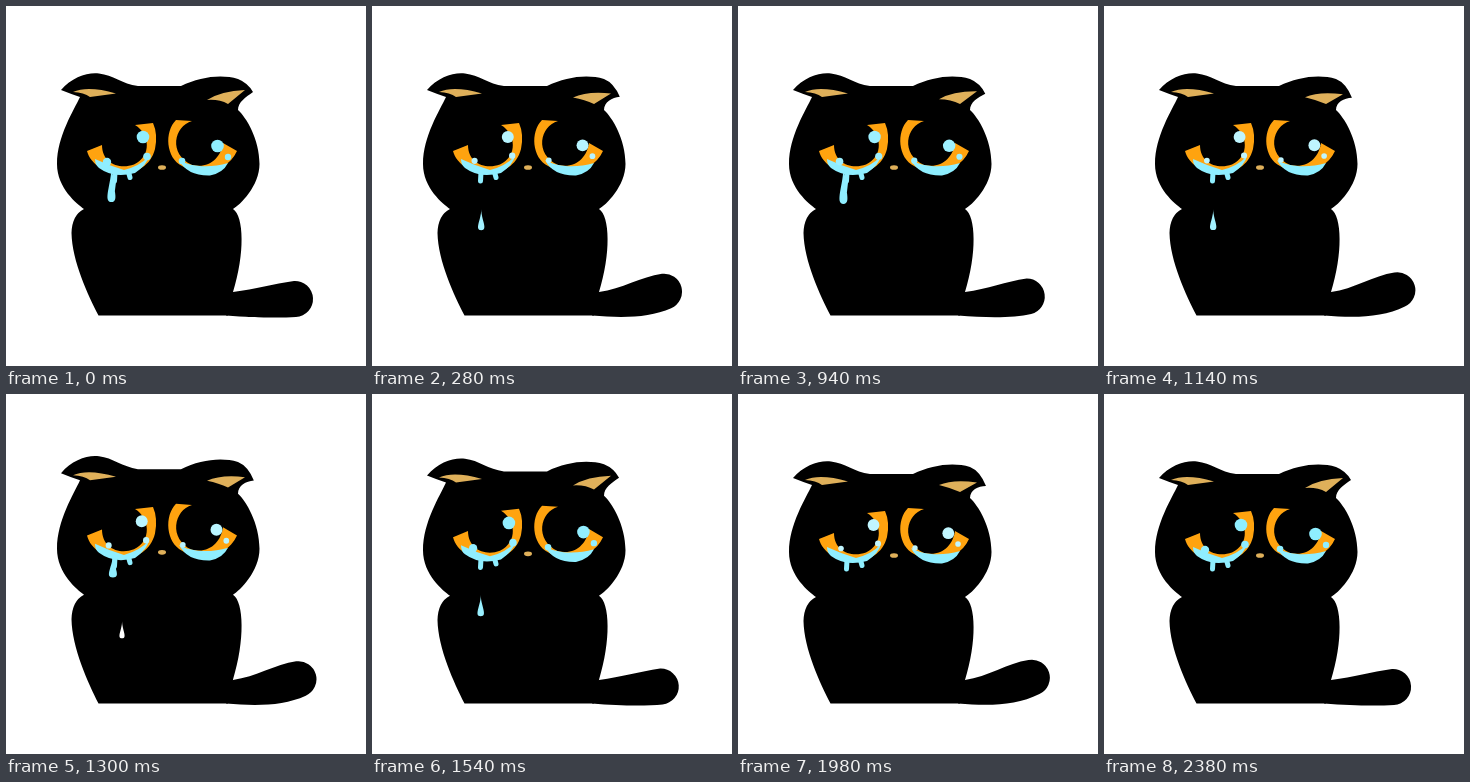
An HTML page that plays this animation: 360x360 px, repeating every 2.4 s.

```html
<!DOCTYPE html>
<html lang="en">
<head>
<meta charset="utf-8">
<title>Crying cat</title>
<style>
  html, body { margin: 0; width: 100%; height: 100%; overflow: hidden; background: #fff; }
  svg { display: block; width: 100vw; height: 100vh; }
  .iris { fill: #ffa30f; }
  .ear { fill: #dfb05a; }
  .water { fill: #8feeff; }
  .stub { stroke: #8feeff; stroke-width: 5; stroke-linecap: round; }
</style>
</head>
<body>
<svg viewBox="0 0 360 360">
  <path id="tail"/>
  <g id="cat">
    <path id="body"/>
    <path class="ear" d="M67 86Q82 79.500 110 87.500L84 91Q78 86.500 67 86Z"/>
    <path id="ear" class="ear"/>
    <path class="iris" d="M81 145C88 172 140 178 149 143Q152 128 147 117L129 119C144 128 146 150 128 158.500C113 164 96 157 96 139Z"/>
    <path class="iris" d="M186 115L170 114C158 126 160 152 176 160C195 172 222 165 231 145L217 137C215 151 204 163 186 159C162 148 168 120 186 115Z"/>
    <path class="water" d="M89 153Q104 160 118 164Q134 160 143 150Q141 159 129 167Q108 173 93 162Q89 159 89 153Z"/>
    <path class="water" d="M173 154C182 160 202 163 222 157Q217 167 204 169.500Q181 170 173 154Z"/>
    <path class="stub" d="M109 166L108.500 175M122.500 166L124 171.500"/>
    <g id="shine"></g>
    <ellipse class="ear" cx="156" cy="161.500" rx="4" ry="2.300"/>
  </g>
  <path id="drip" class="water"/>
  <path id="drop"/>
</svg>
<script>
const LOOP = 2400, SWAY = 800;
const $ = id => document.getElementById(id);
const set = (id, name, value) => $(id).setAttribute(name, value);
const clamp = x => Math.max(0, Math.min(1, x));

// Start and fall time of each tear
const TEARS = [[0, 600], [926, 460], [1445, 220]];
// Time and vertical stretch of the sob
const SOB = [[1220, 0], [1400, .05], [1550, .011], [1680, .02], [1860, 0]];
// x, y, radius, and change of each while swaying
const SHINES = [
  [137, 131, 6.3, -1.5, 0, -.4], [211.5, 140, 6.3, -1.2, -.8, -.4],
  [101, 156, 4.2, 2, -1.5, -1.4], [141, 150.5, 3.8, -1, -1, -.8],
  [176, 155, 3.3, 1, -1, -.6], [222, 151, 3.2, -2, -1, -.4]
];

function stretchAt(t) {
  for (let i = 1; i < SOB.length; i++) {
    const [t0, a] = SOB[i - 1], [t1, b] = SOB[i];
    if (t >= t0 && t < t1) {
      const k = (t - t0) / (t1 - t0);
      return a + (b - a) * k * k * (3 - 2 * k);
    }
  }
  return 0;
}

function teardrop(x, top, bottom, width) {
  const mid = (top + bottom) / 2, w = width * 1.125;
  return `M${x} ${top}C${x} ${mid} ${x + w} ${bottom} ${x} ${bottom}S${x} ${mid} ${x} ${top}Z`
    .replace('S', `C${x - w} ${bottom} `);
}

const paler = k => `rgb(${143 + 112 * k},${238 + 17 * k},255)`;

function drawTears(t) {
  let drip = '', drop = '';
  for (const [start, fall] of TEARS) {
    const p = (t - start) / fall, grow = clamp(1 + p / 1.1);
    if (grow > 0 && p < .12) {
      const bottom = 175 + 21 * grow + 58 * Math.max(0, p), x = 108 - 2.5 * grow;
      drip = teardrop(x, 160, bottom, 8) + `M106.500 168H111L${x + 3} ${bottom - 8}H${x - 2}Z`;
    } else if (p >= .12 && p <= 1) {
      const bottom = 197 + 58 * p;
      drop = teardrop(105 + 3 * p + 13 * p * p, bottom - 26 + 11 * p, bottom, 8 - 3.5 * p);
      set('drop', 'fill', paler(clamp((p - .4) * 2.5)));
    }
  }
  set('drip', 'd', drip);
  set('drop', 'd', drop);
}

function draw(t) {
  const sway = (1 - Math.cos(t / SWAY * 2 * Math.PI)) / 2;
  const x = 290 + 2.5 * sway, y = 293 - 9 * sway;
  set('tail', 'd', `M222 287L227 286C250 283 ${x - 23} ${y - 15} ${x - 2} ${y - 18}
    A18 18 0 0 1 ${x + 9 * sway} ${y + 18 - 2 * sway}C${x - 15} 312 250 312 220 309.5Z`);
  set('body', 'd', `M55 84C66 71 82 66 93 67.500C107 69 116 78 132 80H175
    C194 71 215 68 232 73Q242 77 ${247 + sway} ${86 + 6 * sway}
    C240 ${91 + sway} 232 96 232 104C240 111 253.500 133 253.500 158C253.500 180 234 199 227 203
    C238 210 239 248 227 286L222 309.500H92.500C82 289 66 255 65.500 227Q66 209 78 203
    C71 198 51 182 51 158C51 130 68 104 74 91Q65 88 55 84Z`);
  set('ear', 'd', `M201 ${94 - 3 * sway}Q215 85 239 ${84 + 4.5 * sway}
    L222 98Q213 ${93 + sway} 201 ${94 - 3 * sway}Z`);
  set('cat', 'transform', `translate(0 309) scale(1 ${1 + stretchAt(t)}) translate(0 -309)`);
  $('shine').innerHTML = SHINES.map(([cx, cy, r, dx, dy, dr]) =>
    `<circle cx="${cx + dx * sway}" cy="${cy + dy * sway}" r="${r + dr * sway}"/>`).join('');
  set('shine', 'fill', paler(.45 * sway));
  drawTears(t);
}

function tick() {
  draw(performance.now() % LOOP);
  requestAnimationFrame(tick);
}
tick();
</script>
</body>
</html>
```
